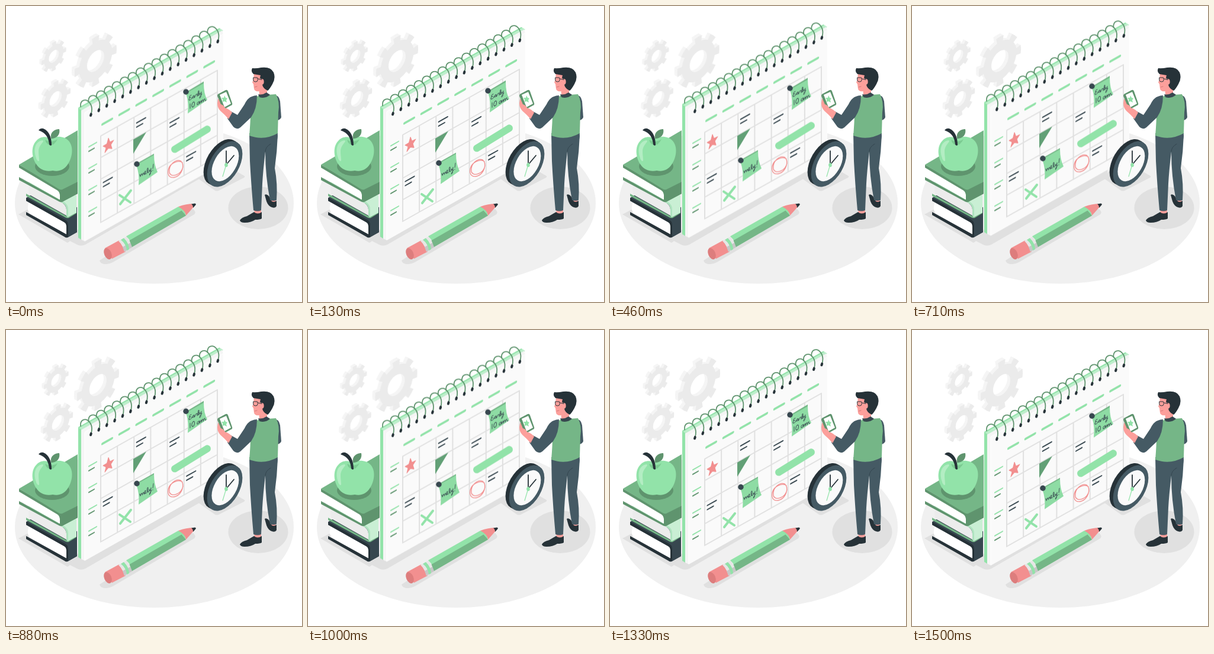
Write an HTML page that moves like this. It is 500 by 500 pixels and loops after 1.54 s.

```html
<!DOCTYPE html>
<html lang="en">
<head>
<meta charset="utf-8">
<title>Planning</title>
<style>
  html, body { margin: 0; width: 100%; height: 100%; overflow: hidden; background: #fff; }
  svg { display: block; width: 100vw; height: 100vh; }
  #calendar { animation: float 1540ms linear infinite; }
  #gears { animation: shake 1540ms linear infinite; }
  @keyframes float {
    0%, 100% { transform: translateY(-.27px); }
    47.4% { transform: translateY(-10px); }
    96.1% { transform: translateY(0); }
  }
  @keyframes shake {
    0%, 100% { transform: translateX(-.13px); }
    8.4%, 86.4% { transform: translateX(-1px); }
    18.2%, 76.6% { transform: translateX(2px); }
    27.9%, 47.4%, 66.9% { transform: translateX(-4px); }
    37.7%, 57.1% { transform: translateX(4px); }
    96.1% { transform: translateX(0); }
  }
  .line { fill: none; stroke-linecap: round; stroke-linejoin: round; }
  .mint { fill: #92e3a9; }
  .green { fill: #75b687; }
  .deep { fill: #5f946e; }
  .slate { fill: #455a64; }
  .ink { fill: #263238; }
  .pink { fill: #f28f8f; }
  .skin { fill: #fc9f9b; }
  .shade { fill: #e0e0e0; }
</style>
</head>
<body>
<svg viewBox="0 0 500 500">
  <defs>
    <g id="cog" fill="none">
      <circle r="24.5" stroke-width="15.5"/>
      <circle r="36" stroke-width="10" pathLength="16" stroke-dasharray=".9 1.1" stroke-dashoffset=".45"/>
    </g>
    <g id="ring" class="line">
      <path d="M-17-15C-18-27-8-29-2-22C3-16 3-7 0-1" stroke="#5f946e" stroke-width="1.800"/>
      <path d="M0 0L.8-2.500" stroke="#263238" stroke-width="4"/>
    </g>
  </defs>

  <ellipse cx="250.500" cy="333" rx="235.500" ry="136" fill="#f0f0f0"/>
  <g class="shade">
    <path d="M21 352L36 344L120 388L104 400Z"/>
    <path d="M98 392L122 404Q128 406 134 403L330 290V250Z"/>
    <path d="M324 291L352 311Q356 314 361 311L402 290Q405 288 401 286L380 274L340 270Z"/>
    <path d="M158 430Q160 436 168 436Q175 436 182 432L318 352Q322 348 316 343L290 345L170 422Z"/>
    <ellipse cx="426" cy="341" rx="50.500" ry="36"/>
  </g>

  <g id="gears"></g>

  <g id="books">
    <path class="ink" d="M34 348L103 386L120 376V382L104 391Q101 392 99 390L34 353Z"/>
    <path fill="#fff" d="M40 330L99 364Q103 368 103 376V386L39 350Q34 340 40 330Z"/>
    <path fill="#37474f" d="M34 324L46 317L120 340V382L104 391Q102 391 102 388V372Q102 367 98 365L34 329Z"/>
    <path class="ink" d="M34 324L100 361Q105 364 105 370V390L102 391V372Q102 367 98 365L34 329Z"/>
    <path class="green" d="M34 317L104 356L119 347V350L106 358Q103 359 100 357L34 321Z"/>
    <path fill="#ececec" d="M40 302L96 333Q102 338 102 344V354L40 319Q36 310 40 302Z"/>
    <path fill="#c9efd4" d="M36 298L60 286L119 320V349L104 357L102 354V342Q101 336 96 333L36 301Z"/>
    <path fill="#aee3bf" d="M36 298L98 331Q105 336 105 343V356L102 355V342Q101 336 96 333L36 301Z"/>
    <path class="deep" d="M22 289L90 327L121 311V317L95 331Q92 332 89 330L22 294Z"/>
    <path fill="#fff" d="M29 275L85 308Q91 313 91 318V327L28 291Q24 283 29 275Z"/>
    <path class="deep" d="M22 268L92 309L121 296V317L94 331Q91 331 91 328V319Q90 313 86 311L22 273Z"/>
    <path class="green" d="M22 268L121 210V297L95 310Q92 311 89 309Z"/>
  </g>

  <g id="apple">
    <ellipse class="deep" cx="78" cy="271" rx="29" ry="16"/>
    <path class="mint" d="M75 224C83 219 99 219 106 228C115 238 112 257 104 268C97 278 88 280 79 278C69 280 58 278 51 267C43 255 42 237 51 228C58 220 68 220 75 224Z"/>
    <path d="M50 254C46 239 51 228 62 227C66 229 55 234 55 246C55 256 58 263 54 262Q51 259 50 254Z" fill="#b3edc3"/>
    <path d="M66 226Q76 232 87 225Q82 235 75 235Q68 234 66 226Z" fill="#7ccb92"/>
    <path class="ink" d="M55 210Q58 206 63 207C73 211 77 222 77 235Q75 237 73 234C72 222 67 214 55 210Z"/>
    <path class="deep" d="M76 224C74 213 82 208 90 208C92 217 86 224 76 224Z"/>
  </g>

  <g id="calendar">
    <g transform="translate(0 .8)">
      <path fill="#bdeecb" d="M122 172L361 37L367 41L133 180L127 176Z"/>
      <path d="M122.500 172L361 37.500" stroke="#92e3a9" stroke-width="2"/>
      <path class="mint" d="M122 172L127 175V394L122 391Z"/>
      <path fill="#f5f5f5" d="M127 176L365 41L367 47V264.700L133 397L127 394Z"/>
      <path fill="#fafafa" d="M133 179.500L367 46.500V264.700L133 397Z"/>
      <path d="M133 179.500L367 47M133 180V396" stroke="#fff" stroke-width="1.200"/>
      <g class="line" transform="matrix(1 -.562 0 1 160 219)">
        <path id="grid" stroke="#e0e0e0" stroke-width="2"/>
        <path id="days" stroke="#92e3a9" stroke-width="4"/>
        <path id="labels" stroke="#92e3a9" stroke-width="2.200"/>
        <path id="sublabels" stroke="#5f946e" stroke-width="2.200"/>
        <path id="entries" stroke="#37474f" stroke-width="2.200"/>
        <path class="pink" stroke="#f28f8f" d="M13 11L15.500 19L22 19.500L17 24.500L19 32L13 28L7 32L9 24.500L4 19.500L10.500 19Z"/>
      </g>
      <path fill="#62a076" d="M215 225L237 212.500L215 249Z"/>
      <g class="line">
        <path d="M193 334L211 311M192 319L210 331" stroke="#92e3a9" stroke-width="4"/>
        <path d="M285 241.500L340 207.500" stroke="#92e3a9" stroke-width="12"/>
        <path d="M298 264C292 259 277 264 274 276C272 288 279 291 287 288C297 284 303 268 295 261C286 258 274 268 276 281C279 290 296 285 299 271" stroke="#f28f8f" stroke-width="1.300"/>
      </g>
      <path class="green" d="M304 145L334 127V134L307 152Z"/>
      <path fill="#8edca4" d="M304 147L334 130Q334 148 340 158L307 181Q309 162 304 147Z"/>
      <path class="green" d="M220 266L250 249V256L224 273Z"/>
      <path fill="#8edca4" d="M220 268L250 251Q250 268 256 280L224 302Q226 284 220 268Z"/>
      <g class="line" stroke="#37474f" stroke-width=".9">
        <path transform="matrix(1 -.5 0 1 309 159)" d="M4-7C0-8 0-4 3-4C-1-4-1 1 3 0C5-1 6-4 8-4C5-4 5 1 8-1L9-4V0C11 0 11-4 12-4H14V0C17-2 18-9 16-8C15-6 15 0 17 0L18-4C18 0 20 0 21-4L20 4C18 7 16 4 22 0"/>
        <path transform="matrix(1 -.5 0 1 310 173)" d="M1-8V0M7-8C3-8 3 0 6 0C9 0 9-8 7-8M16-4C12-5 12 1 15 0L17-4V0C18 0 19-4 20-4V0C21-4 23-5 23-3V0C24-4 26-5 26-3C26-1 26 0 28 0"/>
        <path transform="matrix(1 -.5 0 1 226 288)" d="M0-4L1 0C2-4 4-5 4 0C5-4 7-5 7 0C10-1 11-5 9-5C7-4 8 1 11 0C14-1 15-9 13-8C11-6 13 1 15 0L16-4C16 0 18 0 19-5L18 4C16 7 15 4 20 0M23-10L22-3M22 0V.5"/>
      </g>
      <g fill="#37474f">
        <circle cx="304" cy="144.500" r="4.700"/>
        <circle cx="221" cy="266.500" r="4.700"/>
      </g>
      <g id="rings"></g>
    </g>
  </g>

  <g id="pencil">
    <path class="pink" d="M167 409L191 396L202 415L179 427Z"/>
    <ellipse cx="172" cy="418.500" rx="6" ry="10" transform="rotate(-24 172 418.500)" fill="#dd7d7d"/>
    <path fill="#e6e6e6" d="M190 397L204 389L214 407L200 415Q198 404 190 397Z"/>
    <path fill="#c7c7c7" d="M197 407L210 400L214 407L200 415Z"/>
    <path class="mint" d="M194 395L199 392Q208 401 208 411L204 413Q203 402 194 395Z"/>
    <path class="mint" d="M203 389L291 339L300 341L304 354L213 407Q212 397 203 389Z"/>
    <path class="green" d="M208.500 396L296.500 345.500L304 354L213 407Z"/>
    <path class="pink" d="M291 339Q304 334 318 334L320 336L304 354Q303 345 291 339Z"/>
    <path class="ink" d="M313 334.500L319 333.500Q322 334 320 336.500L316 341Q316 336 313 334.500Z"/>
  </g>

  <g id="clock">
    <g class="ink">
      <circle r="34.500" transform="matrix(.866 -.5 0 1 363.500 263.500)"/>
      <circle r="34.500" transform="matrix(.866 -.5 0 1 366.500 265)"/>
    </g>
    <g transform="matrix(.866 -.5 0 1 369.500 267)">
      <circle class="slate" r="34.500"/>
      <circle r="26.500" cx="1" fill="#fafafa"/>
    </g>
    <g class="line" stroke="#263238" stroke-width="1.800">
      <path d="M372 268V245M372 268L385 252.500"/>
      <path d="M372 268L366 288" stroke="#92e3a9" stroke-width="1.200"/>
    </g>
    <ellipse class="mint" cx="372" cy="268.500" rx="2.800" ry="3.600"/>
  </g>

  <g id="man">
    <path class="slate" d="M452 150Q461 150 463 161L465 188Q463 193 457 193L451 160Z"/>
    <path class="skin" d="M448 325H456L455 333L448 334ZM419 342H431V352L420 353Z"/>
    <path class="ink" d="M437 319Q440 317 444 321L449 330Q453 332 457 329V338Q455 342 449 340Q443 338 440 330Z"/>
    <path class="ink" d="M395 362Q398 357 407 355L419 348Q425 353 432 348V359Q429 361 421 361Q414 366 403 366Q396 366 395 362Z"/>
    <path class="slate" d="M434 218H459Q458 246 454 274Q459 300 457 328Q452 330 446 328Q438 287 438 246Z"/>
    <path class="slate" d="M411 215L459 214Q459 227 455 235L438 246Q434 280 433 300L431 345Q425 348 418 345Q414 300 412 262Z"/>
    <path d="M438 246Q438 238 447 233" class="line" stroke="#344650"/>
    <path class="green" d="M427 151L442 150L456 149Q463 162 460 180L459 215Q436 228 411 219Q413 195 413 181L421 155Z"/>
    <path class="slate" d="M424 151C411 152 407 158 403 166L391 184L380 178L374 190L384 204Q390 210 396 205L414 188Q424 174 424 151Z"/>
    <path class="skin" d="M358 158Q360 154 363 156L371 172Q378 175 382 180L376 191Q370 184 362 177Q357 172 357 164Z"/>
    <path class="deep" d="M358 149L371 142Q374 141 375 144L382 164Q383 167 380 168L369 174Q366 174 365 171L357 152Q357 150 358 149Z"/>
    <path fill="#fff" d="M361 150L372 145L380 165L369 171Z"/>
    <path class="mint" d="M369 151L371 155L374 156L372 159L373 163L369 161L366 162L366 158L364 155L368 155Z"/>
    <path class="skin" d="M361 166Q366 165 370 172L376 176L371 183Q362 179 359 171Z"/>
    <path class="skin" d="M427 136L441 130V149Q434 153 428 150Z"/>
    <path fill="#37474f" d="M426 149Q433 151 440 146L446 150Q438 157 428 154Z"/>
    <path class="skin" d="M419 112H441V134Q438 143 428 144Q420 145 419 140L418 132L416 129L418 124Z"/>
    <path class="ink" d="M416 105Q422 106 431 104Q447 102 452 112Q456 122 450 132Q445 141 442 143Q434 139 433 133L435 124Q431 125 429 121L430 117L418 115Q413 111 416 105Z"/>
    <ellipse class="skin" cx="432.500" cy="128" rx="3.200" ry="4.700"/>
    <g class="line" stroke="#263238">
      <path d="M418 121H424.500Q426.500 125 424 127.500Q419 129 418 126ZM426 123L432 124.500" stroke-width="1"/>
      <path d="M420 137L424 136" stroke="#c96f70" stroke-width=".8"/>
    </g>
  </g>
</svg>
<script>
  const $ = id => document.getElementById(id);
  const times = (n, fn) => Array.from({ length: n }, (_, i) => fn(i)).join('');
  const col = 197 / 7, row = 36.5;
  const draw = (id, d) => $(id).setAttribute('d', d);

  draw('grid',
    times(8, i => `M${i * col} 0V${4 * row}`) +
    times(5, i => `M0 ${i * row}H${7 * col}`));
  draw('days', times(7, i => `M${3 + 28.7 * i}-18h16`));
  draw('labels', times(4, i => `M-20 ${7 + i * row}h13`));
  draw('sublabels', times(4, i => `M-20 ${14.5 + i * row}h9`));

  // Each entry: column, row, offset inside the cell.
  draw('entries', [[2, 0, 12], [4, 1, 7], [0, 2, 8], [5, 3, 7]].map(([c, r, dy]) =>
    `M${c * col + 4.5} ${r * row + dy}h15m-15 7h10`).join(''));

  $('rings').innerHTML = times(17, i =>
    `<use href="#ring" x="${143 + 13.4 * i}" y="${184.5 - 7.75 * i}"/>`);

  // Offset copies behind the face give the gear its thickness.
  const gear = (x, y, scale) => times(7, i => {
    const depth = (6 - i) / 6 * scale ** .5;
    const tone = i < 6 ? '#f5f5f5' : '#ebebeb';
    return `<g transform="translate(${x - 5 * depth} ${y - 3 * depth})` +
      ` scale(${scale}) matrix(.866 -.5 0 1 0 0)"><use href="#cog" stroke="${tone}"/></g>`;
  });
  $('gears').innerHTML = gear(151.5, 93, 1) + gear(81, 85, .585) + gear(84, 157, .71);
</script>
</body>
</html>
```
